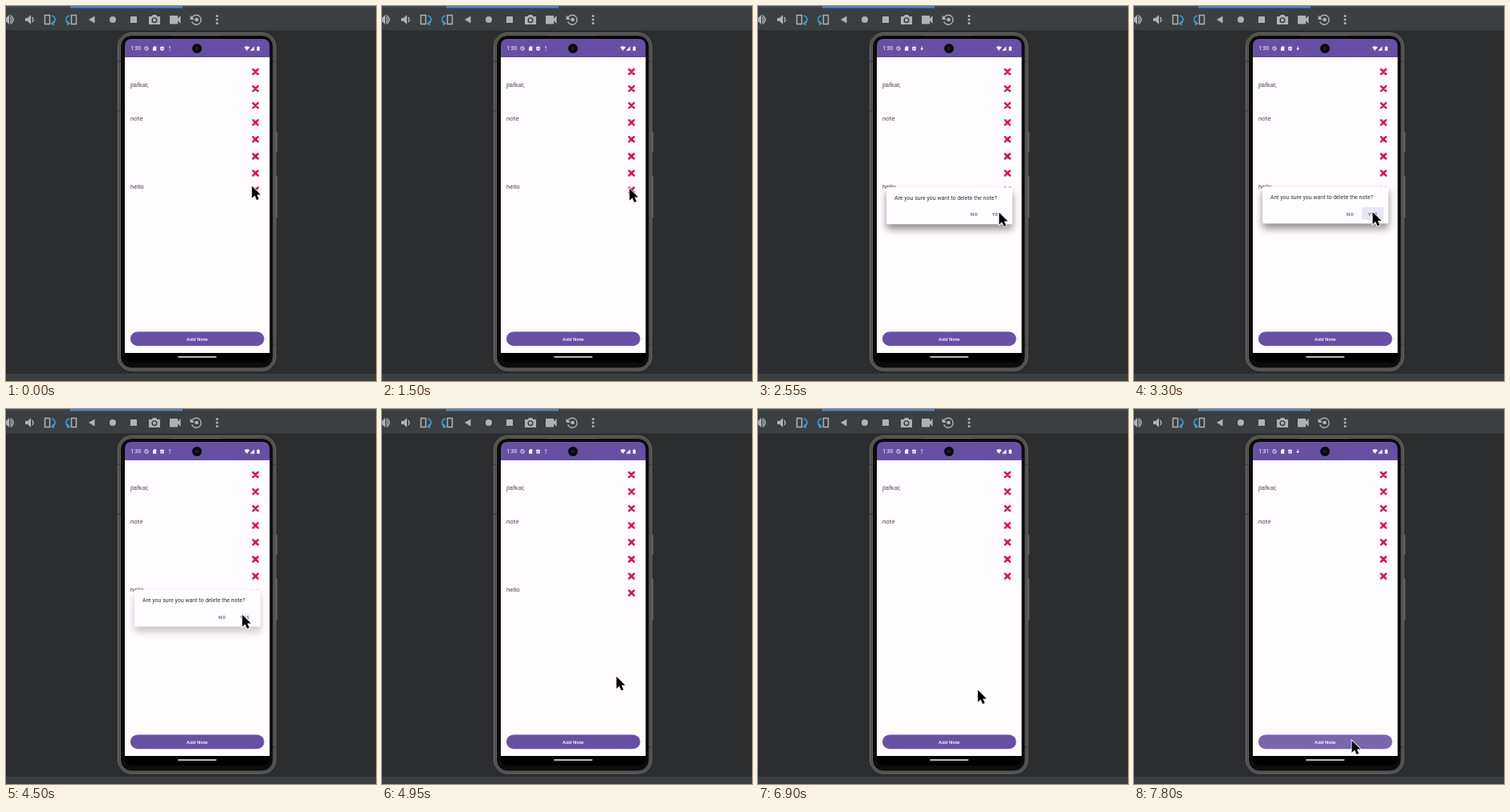
Animation of 461x468 px, one loop 8000 ms. Source, as an HTML page:

```html
<!DOCTYPE html>
<html lang="en">
<head>
<meta charset="utf-8">
<style>
html, body { margin: 0; width: 100%; height: 100%; overflow: hidden; background: #2c2d2f; }
svg { display: block; width: 461px; height: 468px; font-family: Roboto, sans-serif; }
.note { font-size: 7.88px; fill: #49464b; }
.action { font-size: 6.1px; font-weight: 500; letter-spacing: .35px; fill: #6750a4; }
.line { fill: none; stroke: #afb1b3; stroke-width: 1.5; }
</style>
</head>
<body>
<svg viewBox="0 0 461 468">
  <defs>
    <filter id="blur" x="-20%" y="-50%" width="140%" height="200%"><feGaussianBlur stdDeviation="5"/></filter>
    <clipPath id="screen"><rect x="148" y="41" width="180.5" height="392"/></clipPath>
    <path id="cross" d="M-3 -3L3 3M3 -3L-3 3" stroke="#dc0b50" stroke-width="2.5" stroke-linecap="round"/>
    <path id="speaker" d="M-5-2h3l4-4v12l-4-4h-3z"/>
    <g id="rotate">
      <rect x="-6.500" y="-5.500" width="6" height="11" class="line"/>
      <path d="M2 -5q4 1 4 5t-4 5M4.500 2L2 5l3 1.500" fill="none" stroke="#3c9fd4" stroke-width="1.600"/>
    </g>
  </defs>

  <!-- toolbar -->
  <rect width="461" height="30.500" fill="#3c3f41"/>
  <rect width="461" height="2" fill="#3d4b5c"/>
  <rect x="80" width="140" height="2.500" fill="#4a88c7"/>
  <rect y="459" width="461" height="9" fill="#3c3f41"/>
  <g fill="#afb1b3">
    <use href="#speaker" x="2" y="17"/>
    <path class="line" d="M5 14q3 3 0 6M5.500 11.500q7 5.500 0 11"/>
    <use href="#speaker" x="29" y="17"/>
    <path class="line" d="M32.500 14q3 3 0 6"/>
    <use href="#rotate" x="55" y="17"/>
    <use href="#rotate" transform="translate(81 17) scale(-1 1)"/>
    <path d="M103 17l7.500-4.500v9z"/>
    <circle cx="133" cy="17" r="4"/>
    <rect x="155" y="13" width="8" height="8" rx=".5"/>
    <path d="M178 13h3.500l1.500-2h4l1.500 2h3.500v10h-14z"/>
    <circle cx="185" cy="17.700" r="2.800" stroke="#3c3f41" stroke-width="1.400"/>
    <path d="M204 12h10v3.500l3.500-3.500v10l-3.500-3.500v4h-10z"/>
    <path class="line" d="M231.500 15a6 6 0 1 1 0 4.500"/>
    <path d="M229.500 11.500v5.500h5.500zM235.500 15h4v4h-4z"/>
    <circle cx="263" cy="12.500" r="1.500"/><circle cx="263" cy="17" r="1.500"/><circle cx="263" cy="21.500" r="1.500"/>
  </g>

  <!-- phone -->
  <path d="M337.200 157v25M337.200 212v52" stroke="#5d5c5b" stroke-width="2"/>
  <rect x="139.500" y="33.500" width="196.500" height="421.500" rx="17" fill="#4e4d4c" stroke="#706f6d"/>
  <rect x="142.500" y="36.500" width="190.500" height="415.500" rx="14" fill="#0c0c0c" stroke="#656462"/>
  <path d="M208 36.500h60" stroke="#777"/>
  <path d="M139 69h4M139 131h4M332 69h4M332 422h4" stroke="#333"/>
  <rect x="147" y="40" width="182.500" height="405" rx="9"/>
  <path d="M148 64V50q0-9 9-9h162.500q9 0 9 9v14z" fill="#6750a4"/>
  <rect x="148" y="64" width="180.500" height="369" fill="#fffbfe"/>
  <path d="M215 438h46.500" stroke="#f5f5f5" stroke-width="1.600" stroke-linecap="round"/>

  <!-- status bar -->
  <g fill="#fff">
    <text id="clock" x="155.600" y="55.300" font-size="6.500"></text>
    <circle cx="175" cy="53" r="2.300" fill="none" stroke="#fff" stroke-width=".8"/>
    <path d="M173.400 51.400l3.200 3.200" stroke="#fff" stroke-width=".7"/>
    <path d="M183 52l1.500-1.700h2.700v5.400H183z"/>
    <rect x="192.300" y="50.800" width="4.400" height="4.600" rx=".6"/>
    <path d="M193.500 54.500l1-2.500 1 2.500" fill="none" stroke="#6750a4" stroke-width=".7"/>
    <path id="arrow"/>
    <path d="M296.800 51.500q3.400-2.600 6.800 0l-3.400 4.300z"/>
    <path d="M309.300 50.300v5.400h-5.200z"/>
    <path d="M312.600 51h1v-.8h1.400v.8h1v4.800h-3.400z"/>
  </g>
  <circle cx="238" cy="53" r="6" fill="#08080a"/>
  <circle cx="238" cy="53" r="2" fill="#20202b"/>

  <!-- notes -->
  <g id="marks"></g>
  <text class="note" x="155" y="100.600">jlafkal;</text>
  <text class="note" x="155" y="143">note</text>
  <g id="hello">
    <text class="note" x="155" y="227.500">hello</text>
    <use href="#cross" x="310.800" y="229.700"/>
  </g>
  <rect x="155" y="406.500" width="166.700" height="17.700" rx="8.850" fill="#6750a4"/>
  <rect id="ripple" x="155" y="406.500" width="166.700" height="17.700" rx="8.850" fill="#fff"/>
  <text x="238.300" y="417.700" font-size="6.200" font-weight="500" letter-spacing=".05" text-anchor="middle" fill="#fff">Add Note</text>

  <g id="dialog" clip-path="url(#screen)">
    <g id="sheet">
      <rect id="shadow" x="160" y="231" width="157" height="47" rx="2" filter="url(#blur)"/>
      <rect x="160" y="225.500" width="157" height="46" rx="1.500" fill="#fffdff"/>
      <text x="170" y="241.200" font-size="7" fill="#333136">Are you sure you want to delete the note?</text>
      <rect id="press" x="284" y="251" width="27" height="16" rx="2" fill="#e8e7f1"/>
      <text class="action" x="264.800" y="261.500">NO</text>
      <text class="action" x="291.600" y="261.500">YES</text>
    </g>
  </g>

  <path id="cursor" d="M0 0V15L3.500 11.800 6 17.300 8.700 16.100 6.300 10.800H10.800Z" stroke="#fff" stroke-width="1.800" paint-order="stroke"/>
</svg>
<script>
const $ = id => document.getElementById(id);
const LOOP = 8000, STEP = 150, ROW = 21.1;

// The pointer rests between moves.
const start = { x: 306.4, y: 224.8 };
const moves = [
  { from: 0, to: 300, dx: 2, dy: 3 },         // onto the last cross
  { from: 1800, to: 2550, dx: -8, dy: 30 },   // over YES
  { from: 3150, to: 3450, dx: -6, dy: -1 },   // press
  { from: 4500, to: 5100, dx: -3, dy: 103 },  // away
  { from: 5400, to: 5850, dx: -9, dy: 18 },
  { from: 6150, to: 6600, dx: -6, dy: -90 },
  { from: 6750, to: 7050, dx: -5, dy: 126 }   // onto Add Note
];

// Rises from 0 to 1 between two times.
const ramp = (t, from, to) => Math.min(1, Math.max(0, (t - from) / (to - from)));
const set = (id, name, value) => $(id).setAttribute(name, value);

for (let i = 0; i < 7; i++)
  $('marks').innerHTML += `<use href="#cross" x="310.8" y="${82 + ROW * i}"/>`;

function draw(now) {
  const t = Math.floor(now % LOOP / STEP) * STEP;

  let { x, y } = start;
  for (const m of moves) {
    const k = ramp(t, m.from, m.to);
    x += m.dx * k;
    y += m.dy * k;
  }
  set('cursor', 'transform', `translate(${x} ${y})`);

  const shown = ramp(t, 1650, 1950);
  set('dialog', 'opacity', shown - ramp(t, 4500, 4800));
  set('shadow', 'opacity', .42 * (shown - ramp(t, 4200, 4800)));
  set('sheet', 'transform', `translate(0 ${t < 2700 ? .7 : 0})`);
  set('press', 'opacity', ramp(t, 3150, 3300) - ramp(t, 3750, 4200));
  set('ripple', 'opacity', .12 * ramp(t, 7500, 7800));
  set('hello', 'visibility', t < 5700 ? 'visible' : 'hidden');

  $('clock').textContent = t < 7650 ? '1:30' : '1:31';
  const phase = t % 5400;
  set('arrow', 'd', phase >= 2250 && phase < 3900
    ? 'M203.6 50.5h1v2.5h1.5l-2 2.300-2-2.300h1.5z'
    : 'M203.6 50.3h1v2.5h-1zM203.6 54.5h1v1h-1z');

  requestAnimationFrame(() => draw(performance.now()));
}
draw(0);
</script>
</body>
</html>
```
